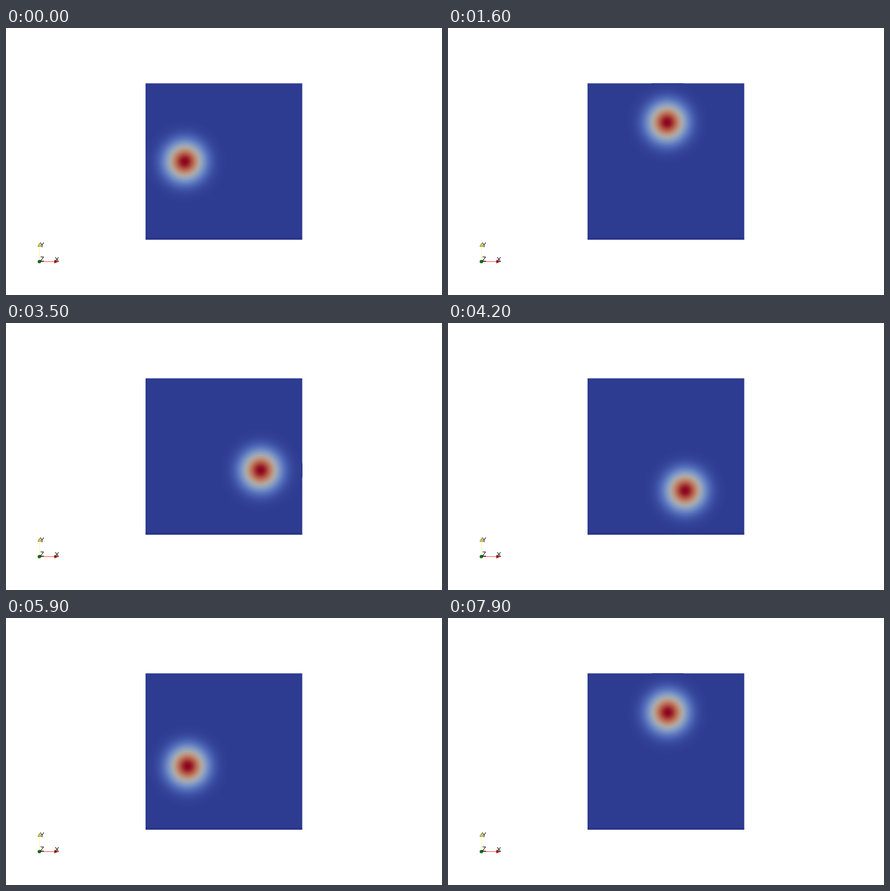
Animation, 828 px wide and 508 px high, one loop 8000 ms. Source, as an HTML page:

```html
<!DOCTYPE html>
<html lang="en">
<head>
<meta charset="utf-8">
<title>Rotating Gaussian</title>
<style>
  html, body { margin: 0; width: 100%; height: 100%; overflow: hidden; background: #fff; }
  svg { display: block; }
  text { font: 12.5px "Liberation Sans", Arial, sans-serif; }
</style>
</head>
<body>
<svg width="828" height="508" viewBox="0 0 828 508">
  <defs>
    <radialGradient id="heat"></radialGradient>
    <clipPath id="field"><rect x="265" y="105" width="298" height="298"/></clipPath>
  </defs>

  <rect id="base" x="265" y="105.3" width="297.6" height="297.5"/>
  <g clip-path="url(#field)">
    <circle id="blob" r="80" fill="url(#heat)"/>
  </g>
  <rect x="265" y="399" width="297.6" height="3.8" fill="#1c2670" opacity=".3"/>

  <g id="axes">
    <path d="M63.5 417V441" stroke="#f8f4a0"/>
    <path d="M66 444.5H92" stroke="#ff3c3c"/>
    <path d="M63.5 409.5L66.5 415.5H60.5Z" fill="#e6e020" stroke="#6e6b10" stroke-width=".8"/>
    <path d="M99 444.5L92 441.5V447.5Z" fill="#c80a0a" stroke="#7a0808" stroke-width=".5"/>
    <circle cx="63.4" cy="444.4" r="3.2" fill="#0a6e14"/>
    <text x="64.2" y="417">Y</text>
    <text x="92.4" y="445.2">X</text>
    <text x="64.8" y="444.3">Z</text>
  </g>
</svg>
<script>
  const STEP = 100, LOOP = 8000;
  const CENTER = { x: 414, y: 254 }, ORBIT = 74.4;
  const SIGMA = 23.8, RADIUS = 80, SHADE = 0.77;

  // Diverging blue-grey-red colour scale, evenly spaced
  const scale = [
    [59, 76, 188], [98, 130, 234], [141, 176, 254], [184, 208, 249], [221, 221, 221],
    [245, 196, 173], [244, 154, 123], [222, 96, 77], [180, 4, 38]
  ];

  function colorAt(v) {
    const p = v * (scale.length - 1);
    const i = Math.min(Math.floor(p), scale.length - 2);
    const rgb = scale[i].map((c, k) => Math.round(SHADE * (c + (scale[i + 1][k] - c) * (p - i))));
    return `rgb(${rgb})`;
  }

  const heat = document.getElementById("heat");
  const blob = document.getElementById("blob");
  const STOPS = 48;
  for (let i = 0; i <= STOPS; i++) {
    const r = RADIUS * i / STOPS;
    const stop = document.createElementNS("http://www.w3.org/2000/svg", "stop");
    const value = i === STOPS ? 0 : Math.exp(-r * r / (2 * SIGMA * SIGMA));
    stop.setAttribute("offset", i / STOPS);
    stop.setAttribute("stop-color", colorAt(value));
    heat.append(stop);
  }
  document.getElementById("base").setAttribute("fill", colorAt(0));

  // The peak turns clockwise by 0.1 rad per step
  function draw(ms) {
    const angle = 0.1 * Math.floor((ms % LOOP) / STEP);
    blob.setAttribute("cx", CENTER.x - ORBIT * Math.cos(angle));
    blob.setAttribute("cy", CENTER.y - ORBIT * Math.sin(angle));
  }

  const start = performance.now();
  function tick() {
    draw(performance.now() - start);
    requestAnimationFrame(tick);
  }
  tick();
</script>
</body>
</html>
```
